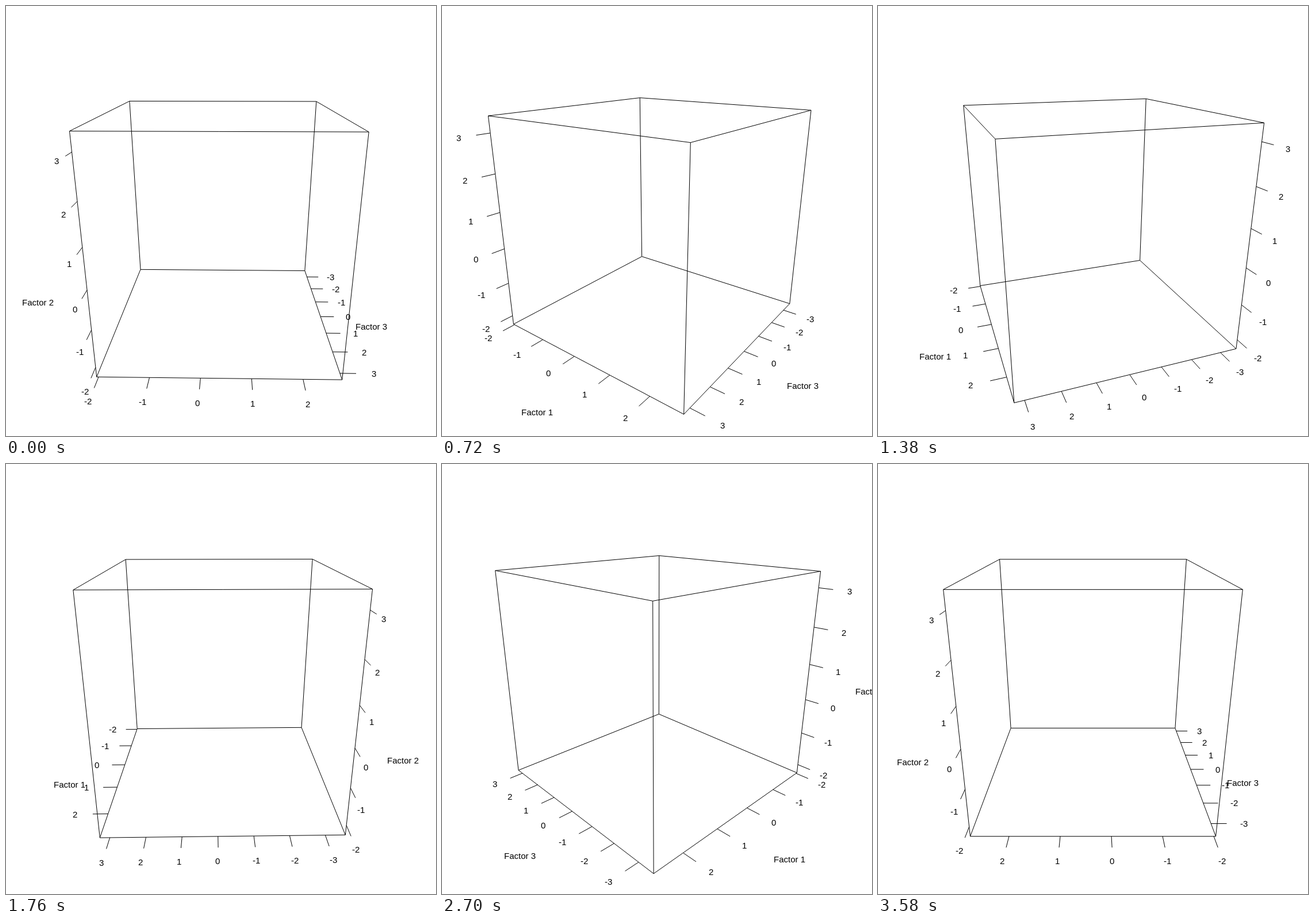
Recreate the animation shown at these times as an HTML page with a canvas. Size 748 px wide and 748 px high, loop 3600 ms.

```html
<!DOCTYPE html>
<html lang="en">
<head>
<meta charset="utf-8">
<title>Rotating factor axes</title>
<style>
  html, body { margin: 0; height: 100%; overflow: hidden; background: #fff; }
  canvas { display: block; }
</style>
</head>
<body>
<canvas id="stage" width="748" height="748"></canvas>
<script>
const SIZE = 748, MID = SIZE / 2;
const FOCAL = 812, DISTANCE = 4.4;
const STEP_MS = 20, STEPS = 180;
const RAD = Math.PI / 180;
const TILT_SIN = Math.sin(20 * RAD), TILT_COS = Math.cos(20 * RAD);

// Distances from the box edge, where the box spans -1 to 1
const TICK = 2 / 15, NUMBER_GAP = 0.284, TITLE_GAP = 0.54, TITLE_SIDE = 0.135;

const ctx = document.getElementById('stage').getContext('2d');
ctx.font = '15px "Liberation Sans", Arial, sans-serif';
ctx.lineWidth = 1;

let sin, cos;

function project([x, y, z]) {
  const rx = x * cos - z * sin;
  const rz = x * sin + z * cos;
  const scale = FOCAL / (DISTANCE - y * TILT_SIN - rz * TILT_COS);
  return [MID + rx * scale, MID - (y * TILT_COS - rz * TILT_SIN) * scale];
}

function line(a, b) {
  ctx.moveTo(...project(a));
  ctx.lineTo(...project(b));
}

// A label vanishes as a whole once its anchor leaves the stage
function label(text, point) {
  const [x, y] = project(point);
  const left = x - ctx.measureText(text).width / 2 - 1;
  const base = y + 5.4;
  if (left < 0 || x > SIZE || base > SIZE + 0.2) return;
  ctx.fillText(text, Math.round(left), Math.round(base));
}

function box() {
  for (const a of [-1, 1]) {
    for (const b of [-1, 1]) {
      line([-1, a, b], [1, a, b]);
      line([a, -1, b], [a, 1, b]);
      line([a, b, -1], [a, b, 1]);
    }
  }
}

// along: axis index, out: index of the tick direction, edge: position of the axis
function axis(title, along, out, edge, origin, unit, first, last) {
  const at = (pos, gap, side = 0) => edge.map((v, i) =>
    i === along ? pos : v * (1 + (i === out ? gap : side)));
  for (let n = first; n <= last; n++) {
    const pos = origin + unit * n;
    line(at(pos, 0), at(pos, TICK));
    label(String(n), at(pos, NUMBER_GAP));
  }
  label(title, at(0, TITLE_GAP, TITLE_SIDE));
}

function draw(degrees) {
  // The tiny extra turn settles which side faces the viewer at right angles
  const angle = (degrees + 1e-6) * RAD;
  sin = Math.sin(angle);
  cos = Math.cos(angle);
  const faceX = Math.sign(sin), faceZ = Math.sign(cos);
  const sideways = Math.abs(sin) > Math.abs(cos);

  ctx.clearRect(0, 0, SIZE, SIZE);
  ctx.beginPath();
  box();
  axis('Factor 1', 0, 2, [0, -1, faceZ], -0.15, 0.417, -2, 2);
  axis('Factor 2', 1, sideways ? 0 : 2,
    sideways ? [faceX, 0, -faceZ] : [-faceX, 0, faceZ], -0.2003, 0.3528, -2, 3);
  axis('Factor 3', 2, 0, [faceX, -1, 0], 0.042, 0.2925, -3, 3);
  ctx.stroke();
}

function tick() {
  draw(Math.floor(performance.now() / STEP_MS) % STEPS + 1);
  requestAnimationFrame(tick);
}
tick();
</script>
</body>
</html>
```
